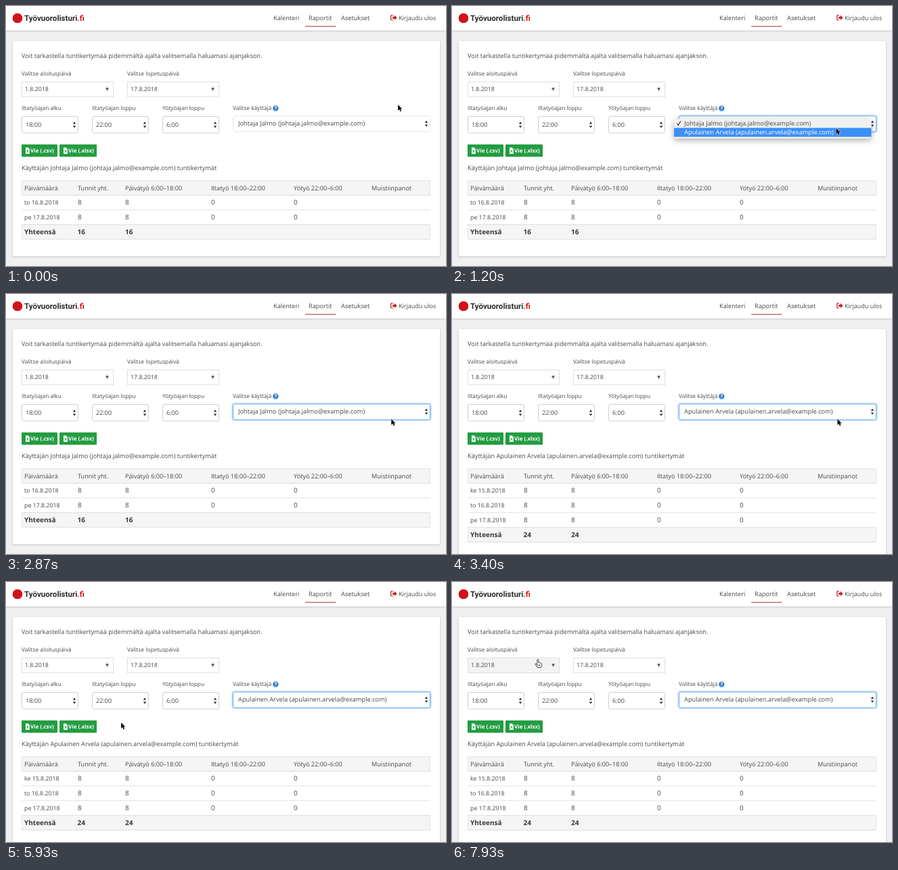
An HTML page that plays this animation: 650 px wide and 385 px high, repeating every 8000 ms.

```html
<!DOCTYPE html>
<html lang="fi">
<head>
<meta charset="utf-8">
<title>Raportit</title>
<style>
  html, body { margin: 0; width: 100%; height: 100%; overflow: hidden; background: #f0f0f0; }
  svg { display: block; width: 650px; height: 385px; }
  text { font-family: "Open Sans", "Noto Sans", sans-serif; fill: #484848; text-rendering: geometricPrecision; white-space: pre; }
  .brand { font-family: Roboto, Arial, sans-serif; font-weight: 700; }
  .soft { filter: drop-shadow(0 1px 1.5px rgba(0, 0, 0, .2)); }
  .menu { filter: drop-shadow(0 3px 4px rgba(0, 0, 0, .3)); }
</style>
</head>
<body>
<svg id="stage" viewBox="0 0 650 385" xmlns="http://www.w3.org/2000/svg"></svg>
<script>
const LOOP = 8000;
const stage = document.getElementById('stage');

function add(tag, attrs = {}, parent = stage) {
  const node = document.createElementNS('http://www.w3.org/2000/svg', tag);
  for (const key in attrs) node.setAttribute(key, attrs[key]);
  return parent.appendChild(node);
}
const group = (parent = stage) => add('g', {}, parent);
const rect = (x, y, width, height, fill, parent, extra) =>
  add('rect', { x, y, width, height, fill, ...extra }, parent);
const path = (d, fill, parent, extra) => add('path', { d, fill, ...extra }, parent);

function label(content, x, y, size, parent, style = '') {
  const node = add('text', { x, y, style: `font-size:${size}px;${style}` }, parent);
  node.textContent = content;
  return node;
}
function field(x, y, w, h, radius, stroke) {
  return rect(x + .5, y + .5, w - 1, h - 1, '#fff', stage, { rx: radius, stroke });
}
function stepper(x, y) {
  path(`M${x - 2.2} ${y - 1.3}h4.4l-2.2 -3.4zM${x - 2.2} ${y + 1.3}h4.4l-2.2 3.4z`, '#3a3a3a');
}
const show = (node, on) => node.setAttribute('display', on ? 'inline' : 'none');

const people = [
  { name: 'Johtaja Jalmo (johtaja.jalmo@example.com)', days: ['to 16', 'pe 17'], sum: 16 },
  { name: 'Apulainen Arvela (apulainen.arvela@example.com)', days: ['ke 15', 'to 16', 'pe 17'], sum: 24 }
];

// Header
rect(0, 0, 650, 36, '#fff', stage, { class: 'soft' });
rect(0, 36, 650, 1, '#dcdcdc');
add('circle', { cx: 17, cy: 18, r: 7.3, fill: '#d0121b' });
const brand = label('Työvuorolisturi', 27, 21.5, 11.6, stage, 'fill:#2b2b2b');
brand.setAttribute('class', 'brand');
const suffix = add('tspan', { fill: '#d0121b' }, brand);
suffix.textContent = '.fi';
label('Kalenteri', 395, 20.6, 9.2);
label('Raportit', 447, 20.6, 9.2);
label('Asetukset', 495, 20.6, 9.3);
rect(442, 29.5, 45, 1.3, '#b5605c');
path('M571.6 13.7h-1.6q-1.3 0 -1.3 1.3v4.6q0 1.3 1.3 1.3h1.6', 'none', stage, { stroke: '#c8202a', 'stroke-width': 1.3 });
path('M571 15.9h2.7v-2.3l4 3.7l-4 3.7v-2.3h-2.7z', '#c8202a');
label('Kirjaudu ulos', 580, 20.6, 9);

// Card and form
const card = rect(10, 52, 631, 318.5, '#fff', stage, { class: 'soft' });
label('Voit tarkastella tuntikertymää pidemmältä ajalta valitsemalla haluamasi ajanjakson.', 23, 77, 9.18);

const dates = [
  [23, 'Valitse aloituspäivä', '1.8.2018'],
  [179, 'Valitse lopetuspäivä', '17.8.2018']
].map(([x, title, value]) => {
  label(title, x, 103.2, 8.3);
  const box = field(x, 112, 136, 23, 0, '#dedede');
  label(value, x + 5, 126.3, 8.8);
  path(`M${x + 124} 121h5l-2.5 5z`, '#666');
  return { box, x, y: 112, w: 136, h: 23, idle: '#fff', hot: '#f3f3f3' };
});

[[23, 'Iltatyöajan alku', '18:00'], [127, 'Iltatyöajan loppu', '22:00'], [231, 'Yötyöajan loppu', '6:00']]
  .forEach(([x, title, value]) => {
    label(title, x, 154.2, 8.25);
    field(x, 163, 84, 25.5, 2.5, '#cfcfcf');
    label(value, x + 6, 179.1, 9.1);
    stepper(x + 78, 176);
  });

label('Valitse käyttäjä', 335, 154.2, 8.25);
add('circle', { cx: 398.3, cy: 151.5, r: 4.2, fill: '#3282d6' });
label('?', 396.4, 154.4, 7.8, stage, 'fill:#fff;font-weight:700');
const glow = rect(334.2, 161.7, 293.6, 25.6, 'none', stage,
  { rx: 3.5, stroke: '#b9d9fa', 'stroke-width': 1.6 });
const userBox = field(335, 162.5, 292, 24, 2.5, '#e6e6e6');
stepper(621, 174.3);

const buttons = [[23, 53, 'Vie (.csv)'], [79, 55, 'Vie (.xlsx)']].map(([x, w, title]) => {
  const box = rect(x, 205, w, 18.3, '#249d42', stage, { rx: 1 });
  path(`M${x + 6} 209.5h3.5l2.3 2.3v7.2h-5.8z`, '#fff');
  path(`M${x + 7.5} 213.2l2.8 3.8m0 -3.8l-2.8 3.8`, 'none', stage, { stroke: '#249d42', 'stroke-width': .9 });
  label(title, x + 13, 217.2, 8, stage, 'fill:#fff;font-weight:700');
  return { box, x, y: 205, w, h: 18.3, idle: '#249d42', hot: '#1f8939' };
});

// One report for each person
function buildReport({ name, days, sum }) {
  const g = group();
  const rowHeight = 21.75, top = 258.5;
  const totalTop = top + rowHeight * (days.length + 1);
  const line = y => rect(23, y, 604, 1, '#e2e2e2', g);
  label(name, 343, 177.2, 9.3, g);
  label(`Käyttäjän ${name} tuntikertymät`, 23, 243.2, 9.2, g);
  [top, totalTop].forEach(y => rect(23.5, y, 603, rowHeight, '#f5f5f5', g, { stroke: '#e6e6e6' }));
  [[27, 'Päivämäärä'], [106, 'Tunnit yht.'], [176, 'Päivätyö 6:00–18:00'], [303, 'Iltatyö 18:00–22:00'],
    [425, 'Yötyö 22:00–6:00'], [540, 'Muistiinpanot']].forEach(([x, s]) => label(s, x, 272.8, 9.15, g));
  days.forEach((day, i) => {
    const y = top + rowHeight * (i + 1);
    line(y - .5);
    label(`${day}.8.2018`, 27, y + 14.2, 8.8, g);
    [[106, 8], [176, 8], [303, 0], [425, 0]].forEach(([x, n]) => label(n, x, y + 14.2, 9.8, g));
  });
  line(totalTop - .5);
  line(totalTop + rowHeight - .5);
  [['Yhteensä', 27], [sum, 105.5], [sum, 176]].forEach(([s, x]) =>
    label(s, x, totalTop + 14.5, 10, g, 'font-weight:700;fill:#383838'));
  return g;
}
const reports = people.map(buildReport);

// Open list
const menu = group();
rect(328, 166.5, 291.5, 29.8, '#f0f0f0', menu, { rx: 3.5, class: 'menu' });
const choice = rect(328, 180.5, 291.5, 13.2, '#3b8ff6', menu);
path('M332.4 173.8l1.9 2.7l3.6 -6', 'none', menu, { stroke: '#333', 'stroke-width': 1.2 });
label(people[0].name, 343, 177.1, 9.3, menu);
const option = label(people[1].name, 343, 190.3, 9.35, menu);

// Pointer
const ring = add('circle', { r: 13, fill: 'none', stroke: '#111', 'stroke-width': 2 });
const pointer = group();
const arrow = path('M0 0V8.9L2 7.1L3.5 10.3L5.1 9.6L3.8 6.5H6.4Z', '#111', pointer,
  { stroke: '#fff', 'stroke-width': 1, 'paint-order': 'stroke', 'stroke-linejoin': 'round' });
const hand = path('M-1.1 4V-4.2Q-1.1 -5.2 -.1 -5.2T.9 -4.2V-.7Q2.3 -1.3 2.7 -.1Q4 -.6 4.3 .6' +
  'Q5.6 .2 5.6 1.6V3.4Q5.6 5.2 4.6 6.6H-.6L-3.9 2.3Q-4.6 1 -3.4 .9Q-2.6 .9 -1.1 2.6' +
  'M1.3 2.3V4.6M2.9 2.3V4.6', '#fff', pointer, { stroke: '#222', 'stroke-width': .85, 'stroke-linejoin': 'round' });

// time, x, y
const track = [
  [70, 579, 146], [620, 568, 173], [880, 568, 173], [1180, 567.5, 181], [1500, 567.5, 181],
  [2000, 569, 185], [4150, 569.5, 185], [5350, 170, 208], [6050, 170, 208],
  [6750, 117, 277], [7100, 117, 277], [7850, 127, 120]
];
const clicks = [[640, 900], [2380, 2680]];
const OPEN = 780, PICK = 2720, LOADED = 2950;

function position(t) {
  const i = track.findIndex(step => step[0] > t);
  if (i === 0) return track[0].slice(1);
  if (i < 0) return track[track.length - 1].slice(1);
  const [t0, x0, y0] = track[i - 1], [t1, x1, y1] = track[i];
  const p = (t - t0) / (t1 - t0), ease = p * p * (3 - 2 * p);
  return [x0 + (x1 - x0) * ease, y0 + (y1 - y0) * ease];
}

function draw(t) {
  const [x, y] = position(t);
  const focused = t >= OPEN, open = focused && t < PICK, loaded = t >= LOADED;
  show(reports[0], !loaded);
  show(reports[1], loaded);
  card.setAttribute('height', loaded ? 340.5 : 318.5);
  show(glow, focused);
  userBox.setAttribute('stroke', focused ? '#71aff0' : '#e6e6e6');

  show(menu, open);
  const chosen = y > 178;
  show(choice, chosen);
  option.style.fill = chosen ? '#fff' : '#484848';

  let overLink = false;
  for (const target of [...dates, ...buttons]) {
    const over = x >= target.x && x <= target.x + target.w && y >= target.y && y <= target.y + target.h;
    target.box.setAttribute('fill', over ? target.hot : target.idle);
    overLink = overLink || over;
  }
  show(arrow, !overLink);
  show(hand, overLink);
  pointer.setAttribute('transform', `translate(${x} ${y})`);

  show(ring, clicks.some(([from, to]) => t >= from && t < to));
  ring.setAttribute('cx', x);
  ring.setAttribute('cy', y);
}

const start = performance.now();
function tick() {
  draw((performance.now() - start) % LOOP);
  requestAnimationFrame(tick);
}
tick();
</script>
</body>
</html>
```
